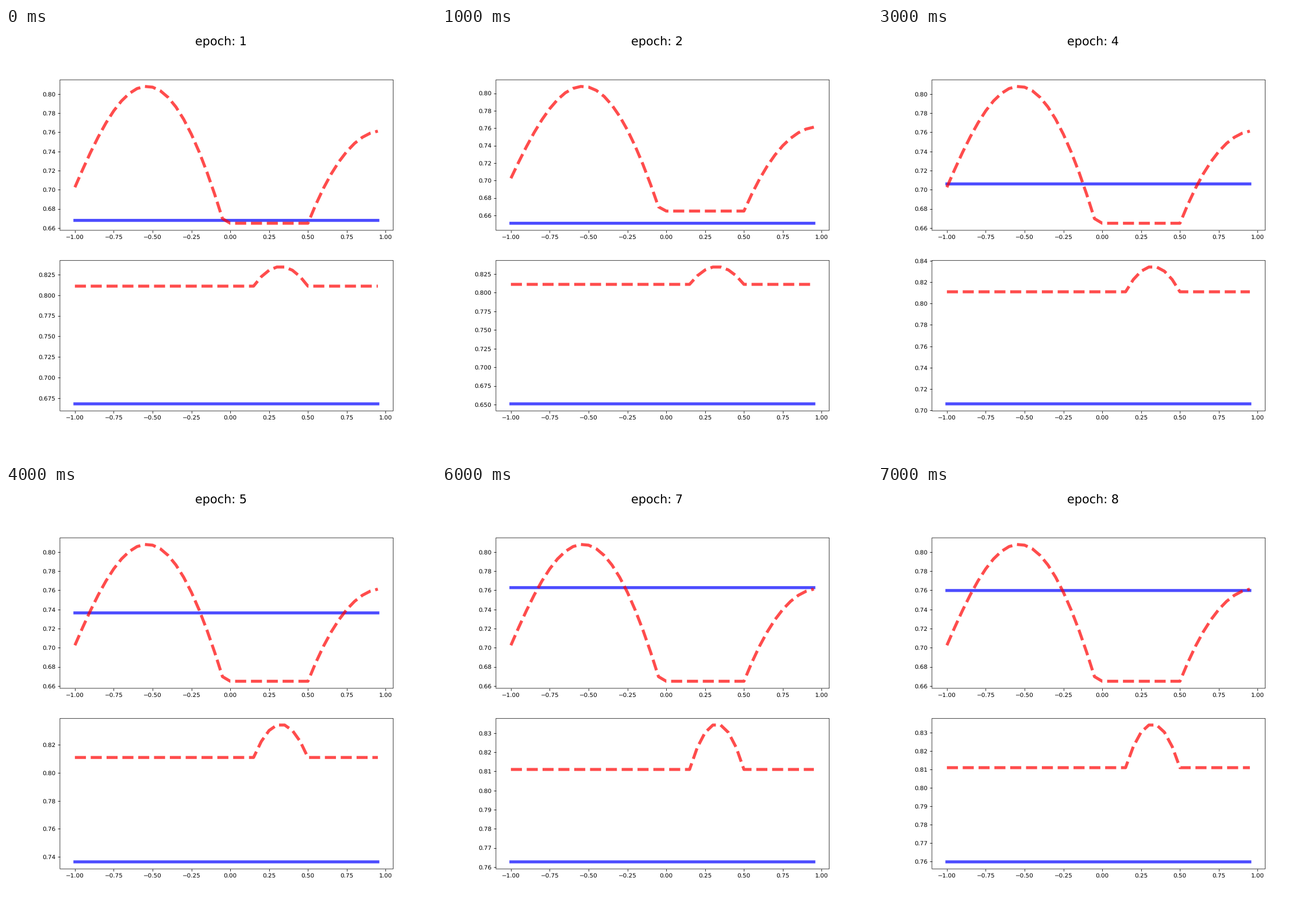
A matplotlib script for the animation above (8000 ms loop, 748x748 px).

```python
import numpy as np
import matplotlib.pyplot as plt
from matplotlib.animation import FuncAnimation
from matplotlib.transforms import Affine2D

# Soft, unsnapped lines and letters
plt.rcParams.update({"path.snap": False, "text.hinting": "no_hinting"})

# Predicted level after each epoch
LEVELS = [0.6679, 0.6509, 0.6727, 0.7060, 0.7363, 0.7559, 0.7627, 0.7597]
NUDGE = Affine2D().translate(0.37, -0.37)

x = np.arange(40) * 0.05 - 1


def two_humps(x):
    """A tall hump on the left, a flat valley, a half hump on the right."""
    u = x + 0.5375
    left = 0.8079 - 0.601 * u**2 - 0.1005 * u**3 + 0.2885 * u**4
    v = 0.98 - x
    right = 0.7615 - 0.3974 * v**2 - 0.0481 * v**3
    curve = np.where(x < 0.25, left, right)
    valley = (x > -0.025) & (x < 0.525)
    return np.where(valley, 0.6649, curve)


def small_bump(x):
    """A flat line with one parabolic bump."""
    return np.maximum(0.811, 0.8347 - 0.78 * (x - 0.325) ** 2)


fig, axes = plt.subplots(2, 1, figsize=(10, 10), dpi=74.8)
title = fig.suptitle("", fontsize=20)

predictions = []
for ax, target in zip(axes, (two_humps, small_bump)):
    # The frame is one rectangle, set slightly off the axes' edges
    ax.spines[:].set_visible(False)
    ax.patch.set(edgecolor="black", linewidth=0.72,
                 transform=ax.transAxes + NUDGE)
    line, = ax.plot(x, np.full_like(x, LEVELS[0]), "b-", lw=5, alpha=0.7)
    ax.plot(x, target(x), "r--", lw=5, alpha=0.7)
    predictions.append(line)


def update(i):
    title.set_text(f"epoch: {i + 1}")
    for ax, line in zip(axes, predictions):
        line.set_ydata(np.full_like(x, LEVELS[i]))
        ax.relim()
        ax.autoscale_view()
    return [title, *predictions]


anim = FuncAnimation(fig, update, frames=len(LEVELS), interval=1000,
                     repeat=True, repeat_delay=0, blit=False)
plt.show()
```
